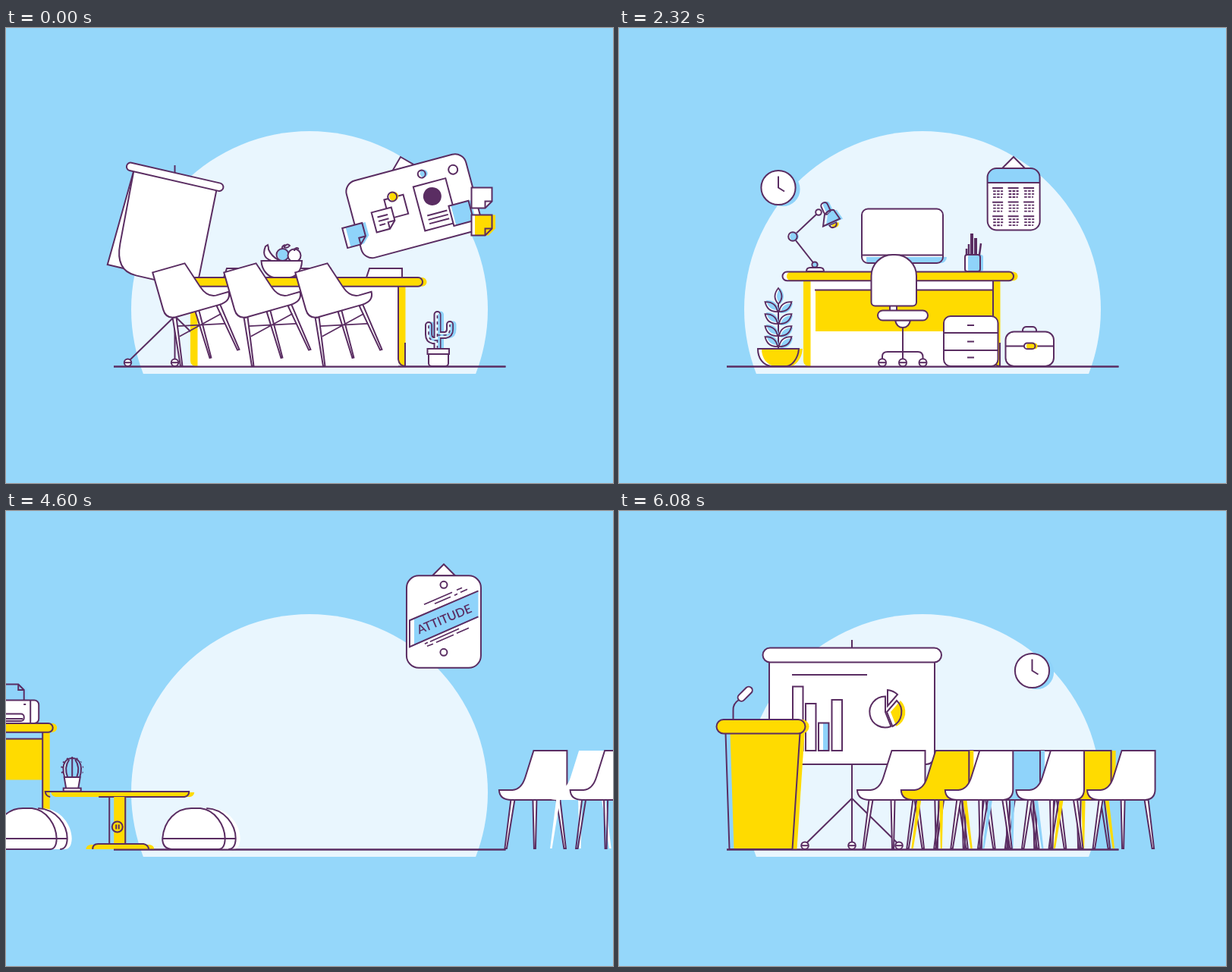
Animation of 800x600 px, one loop 6.2 s. Source, as an HTML page with a canvas:

```html
<!DOCTYPE html>
<html lang="en">
<head>
<meta charset="utf-8">
<title>Office rooms</title>
<style>
html, body { margin: 0; width: 100%; height: 100%; overflow: hidden; background: #95d7fa; }
canvas { display: block; }
</style>
</head>
<body>
<canvas id="stage" width="800" height="600"></canvas>
<script>
const c = document.getElementById('stage').getContext('2d');
const LOOP = 6200, FLOOR = 446.5;
const SKY = '#95d7fa', PALE = '#e9f6fe', INK = '#5a2d62', SUN = '#ffdb00', BLUE = '#8fd3fa', WHITE = '#fff';
let t = 0;

// timing
const part = (a, d) => Math.min(1, Math.max(0, (t - a) / d));
const come = (a, d, from) => from * (1 - part(a, d)) ** 3;
const go = (a, d, to) => to * part(a, d) ** 3;
const smooth = (a, d) => { const p = part(a, d); return p * p * (3 - 2 * p); };
const out = (a, d) => 1 - (1 - part(a, d)) ** 3;
const swing = (a, amp, decay, period) => {
  const s = Math.max(0, t - a);
  return amp * Math.exp(-s / decay) * Math.cos(2 * Math.PI * s / period);
};

// drawing
function at(dx, dy, fn) {
  c.save(); c.translate(dx, dy); fn(); c.restore();
}
function turn(x, y, deg, fn) {
  c.save(); c.translate(x, y); c.rotate(deg * Math.PI / 180); c.translate(-x, -y); fn(); c.restore();
}
function fill(p, color, dx = 0, dy = 0) {
  at(dx, dy, () => { c.fillStyle = color; c.fill(p); });
}
function ink(p, w = 2) {
  c.strokeStyle = INK; c.lineWidth = w; c.stroke(p);
}
function shape(p, color = WHITE, dx = 0, base = WHITE) {
  if (dx && base) fill(p, base);
  if (color) fill(p, color, dx);
  ink(p);
}
const path = d => new Path2D(d);
const line = (d, w) => ink(path(d), w);
function box(x, y, x2, y2, r = 0) {
  const p = new Path2D(); p.roundRect(x, y, x2 - x, y2 - y, r); return p;
}
function disc(x, y, r) {
  const p = new Path2D(); p.arc(x, y, r, 0, 7); return p;
}
function wheel(x, r = 4.7) {
  shape(disc(x, 441.2, r)); line(`M${x - r} 441.2h${2 * r}`);
}
function note(x, y, color, dx) {
  const p = path(`M${x} ${y}h27v18l-9 9h-18z`);
  shape(p, color, dx);
  line(`M${x + 27} ${y + 18}h-9v9`);
}
function clock(x, y) {
  const p = disc(x, y, 22.6);
  fill(p, BLUE, 6, 2); fill(p, WHITE); ink(p);
  line(`M${x} ${y - 15}v15l8 5`);
}
function hanger(x, w) {
  shape(path(`M${x - w} 185L${x} 170L${x + w} 185z`));
}

// chair facing right, back edge at x = 0
const seat = path('M0 317H44L55 352Q60 368 72 369H89.5Q89 382 73 382H13Q0 381 0 368z');
const legs = path('M9 382h5L4 446H1.5zM40 382h5L43.5 446h-2zM69 382h5L82 446h-2.5z');
function chair(x) {
  at(x, 0, () => {
    shape(legs); line('M12 394L73 408M72 394L11 408', 1.7);
    shape(seat);
  });
}
function rowChair(x, color, dx) {
  at(x + 89.5, -1, () => {
    c.scale(-1, 1);
    fill(legs, color, -dx); fill(seat, color, -dx);
    ink(legs);
    if (dx > 0 || color === WHITE) fill(seat, color);
    ink(seat);
  });
}

// the desk reshapes from room to room
const desks = [
  [213.5, 549, 329, 243, 517, 255, 517, 341, 341, 1],
  [215.5, 520, 321.5, 243, 493, 259, 493, 345.5, 400, 1],
  [135.5, 454.5, 280, 152.5, 441, 167.5, 441, 300.5, 354.5, 0]
];
function desk() {
  const p = smooth(1400, 320), q = smooth(2680, 380);
  const [x0, x1, y, l, r, a, b, h0, h1, w] = desks[0].map((v, i) =>
    v + (desks[1][i] - v) * p + (desks[2][i] - desks[1][i]) * q);
  const under = y + 12;
  c.globalAlpha = w;
  fill(box(l + 9, under, r, 446), WHITE);
  c.globalAlpha = 1;
  fill(box(l, under, l + 9.5, 446, [0, 0, 0, 7]), SUN);
  if (h1 - h0 > 2) {
    fill(box(a, h0, b, h1), SUN);
    line(`M${a - 1} ${h0}H${b}`);
  }
  fill(box(r, under, r + 9.5, 446, [0, 0, 0, 7]), SUN);
  line(`M${r} ${under}V437Q${r + 1} 445 ${r + 9} 446V${446 - 44 + 13 * (1 - q)}`);
  const top = box(x0, y, x1, y + 11.7, 5.8);
  fill(top, WHITE); fill(top, SUN, 5.5); ink(top);
}

function easel() {
  at(0, go(1060, 300, -460), () => {
    line('M222.5 181V437M222.5 380L163 438M222.5 380L282 438');
    wheel(160.5); wheel(222.5); wheel(284);
    turn(222.5, 196, swing(0, 13, 220, 600), () => {
      shape(path('M168 200L162 329H186V200z'));
      shape(path('M168 200L172 298C173 324 184 334.500 202 334.500H266C279 333 284 324 283 312L280 200z'));
      shape(box(157.5, 191, 288, 201.500, 5.2));
    });
  });
}

function board() {
  at(0, go(1130, 300, -400), () => turn(520, 170, swing(0, -15, 560, 1000), () => {
    hanger(520, 15);
    shape(box(438.5, 184.5, 601.5, 289.5, 15));
    shape(disc(541, 199, 5), BLUE, 3);
    shape(disc(582.5, 204, 6));
    shape(box(484.5, 219, 510.5, 245));
    shape(disc(496, 218, 6), SUN, 2);
    note(464, 231, WHITE, 0);
    line('M470 239h14M470 244.500h14M470 250h8');
    shape(box(526, 212.5, 570, 272.5));
    fill(disc(547, 231, 12), INK);
    line('M534 254h27M534 259.500h27M534 265h27');
    note(421.5, 241, BLUE, 4.5);
    const s = box(564.500, 249, 591.5, 276);
    shape(s, BLUE, 3);
  }));
}

function bowl() {
  fill(disc(366, 298.5, 8), BLUE); ink(disc(364.500, 299, 8));
  line('M364 292q-1-5 4-6M366 289q5-6 8-2q-3 4-8 2');
  shape(disc(380, 300, 8.5)); line('M380 294q0-3 3-4q3 0 2 2');
  shape(path('M342 288l3-2q1 3 1 6q4 9 13 14l-4 2q-20-3-13-20z'));
  shape(path('M336.500 307H390C390 321 380 329 374 329H353C346 328 337 320 336.500 307z'));
}

function cactus() {
  const p = path('M568.500 423V378M568.500 412H563Q557 411 557 404V392M568.500 405H579Q585 404 585 397V391');
  c.lineCap = 'round';
  at(4, 0, () => { c.strokeStyle = BLUE; c.lineWidth = 9; c.stroke(p); });
  ink(p, 10);
  c.strokeStyle = PALE; c.lineWidth = 6; c.stroke(p);
  at(2, 0, () => { c.strokeStyle = BLUE; c.lineWidth = 2.5; c.stroke(p); });
  c.setLineDash([4, 4]); c.lineCap = 'butt'; ink(p, 1.6); c.setLineDash([]);
  shape(box(557, 428, 583, 446, [0, 0, 4, 4])); shape(box(555.5, 423, 584, 430));
}

function meeting() {
  easel(); board();
  at(0, go(1230, 300, -420), () => {
    note(613.5, 210.500, WHITE, 0); note(613.5, 246.5, SUN, 4.5);
  });
  const up = go(1260, 280, -460);
  at(0, up, () => [287, 381, 475].forEach(x => shape(path(`M${x} 329l4-12h43v12z`))));
  desk();
  at(0, up, bowl);
  at(go(1310, 300, 300), 0, cactus);
  const tilt = -16 * Math.exp(-t / 150) * Math.abs(Math.cos(Math.PI * t / 300));
  [228.5, 322.5, 416.5].forEach((x, i) => {
    at(go(1300 + i * 40, 320, -560), 0, () => turn(x + 1.5, 446, tilt, () => chair(x)));
  });
}

function lamp() {
  line('M258 312L229 275L263 243');
  shape(path('M247 321Q247 316 252 316H265Q270 316 270 321z'));
  shape(disc(258, 312, 3.6), BLUE, 1);
  shape(disc(229, 275, 5.8), BLUE, 2);
  shape(disc(263, 243, 3.8));
  const bulb = path('M277 260Q280 265 285 262Q288 259 286 256z');
  fill(bulb, SUN, 3); ink(bulb);
  turn(272, 237, -25, () => shape(box(267.5, 230, 276.5, 246, 4), BLUE, 3));
  const shade = path('M271 246Q277 239 283 240L291 251.500L269 261.500z');
  fill(shade, BLUE, 4); ink(shade);
}

function plant() {
  const leaf = (x, y, deg) => turn(x, y, deg, () => {
    const p = path(`M${x} ${y}q-9-10 0-21q9 11 0 21z`);
    fill(p, WHITE); fill(p, BLUE, 2.5); ink(p, 1.8);
  });
  line('M210 423V352');
  [374, 390, 406, 420].forEach(y => { leaf(209, y, -52); leaf(211, y, 52); });
  leaf(210, 364, 0);
  shape(path('M183 423H237C236 437 227 445.500 221 446H200C190 444 183 436 183 423z'), SUN, 5);
}

function calendar() {
  hanger(520, 15);
  const p = box(485.5, 185, 554.5, 266.5, 12);
  fill(p, WHITE);
  c.save(); c.clip(p); c.fillStyle = BLUE; c.fillRect(485, 185, 70, 19); c.restore();
  ink(p); line('M485.500 204h69');
  for (let i = 0; i < 9; i++) {
    const x = 492 + i % 3 * 20.5, y = 211 + (i / 3 | 0) * 18.6;
    line(`M${x} ${y}h14`);
    c.setLineDash([3.6, 1.4]);
    for (let k = 1; k < 4; k++) line(`M${x + 1} ${y + k * 4}h${k < 3 ? 13 : 12}`, 1.8);
    c.setLineDash([]);
  }
}

function officeChair() {
  line('M374 394V437M347 437V433Q347 427 354 427H394Q400.500 427 400.500 434V437');
  [347, 374, 400.5].forEach(x => wheel(x, 5));
  shape(path('M364 385.500H384Q382 395 374 395Q366 395 364 385.500z'));
  shape(box(357, 365, 366, 373));
  shape(box(332.5, 299, 392, 366.5, [28, 28, 5, 5]));
  shape(box(341, 372.5, 407, 385.5, 6.5));
}

function briefcase() {
  line('M532 400V398Q533 394 537 394H545Q549 394 550 398V400');
  shape(box(509.5, 400.5, 573, 446, 11));
  line('M509.500 419.500H573');
  shape(box(534, 415.5, 548.5, 423.3, 3.9), SUN, 3);
}

function office() {
  at(0, come(1580, 330, -300) + go(2600, 230, -360), () => clock(210, 210.5));
  at(0, come(1500, 300, -300) + go(2620, 250, -380), () =>
    turn(520, 170, t < 1700 ? 9 : swing(1700, 9, 160, 450), calendar));
  if (t < 2900) {
    at(0, come(1570, 330, -360) + go(2640, 250, -460), () => {
      const m = box(320, 238.5, 427, 310, 8);
      fill(m, WHITE); fill(box(326, 302, 432, 310, [0, 0, 8, 3]), BLUE); ink(m);
      line('M320 299.500H427');
    });
    at(0, come(1640, 330, -380) + go(2610, 250, -440), lamp);
    at(0, come(1660, 300, -380) + go(2670, 230, -440), () => {
      line('M461 300V285M475 299L477 284M458 299V291', 2.5);
      line('M465 300V271M470 300V277', 4);
      shape(box(456, 299, 476, 321, 3), BLUE, 4);
    });
  }
  desk();
  at(come(1560, 350, -300), go(2600, 280, -520), plant);
  at(come(1520, 350, 520) + go(2620, 300, 520), 0, officeChair);
  at(come(1590, 340, 420) + go(2600, 280, 420), 0, () => {
    shape(box(428, 380, 499.5, 446, 9));
    line('M428 402H499.500M428 425H499.500M459 392h9M459 413.500h9M459 434.500h9');
  });
}

function poster() {
  hanger(577, 15);
  shape(box(528, 185, 626, 306.5, 16));
  const p = out(3300, 350);
  if (!p) return;
  c.save();
  c.beginPath(); c.rect(528, 186, 98 * p, 120); c.clip();
  shape(disc(577, 197, 4.5)); shape(disc(577, 286, 4.5));
  const band = path('M622.500 205L532 244V279L622.500 239');
  fill(path('M622.500 206L538 242V277L622.500 240z'), BLUE);
  ink(band);
  line('M551 223L588 207M565 222L586 213M591 211l4-2M599 207l9-4M601 201l-7 3', 1.8);
  line('M552 275l4-2M559 272L597 255M555 278l8-3M567 273L590 263M594 261l16-7', 1.8);
  c.translate(577.5, 242); c.rotate(-0.4);
  c.font = '600 16px Lato, sans-serif'; c.textAlign = 'center'; c.textBaseline = 'middle';
  c.fillStyle = INK; c.fillText('ATTITUDE', 0, 1);
  c.restore();
}

function pouf(x) {
  at(x, 0, () => {
    const back = path('M30 392H58C82 393 96.500 414 96.500 432Q96 446 87 446H12Q0 445 0 432C2 408 18 392 38 392z');
    fill(back, WHITE, 6); fill(back, WHITE);
    line('M58 392C82 393 96.500 414 96.500 432Q96 446 87 446');
    shape(path('M0 432C2 408 18 392 38 392H50C70 394 82 415 82.500 432Q82 446 74 446H12Q0 445 0 432z'));
    line('M0 432H96.500');
  });
}

function roundTable() {
  fill(path('M452 371H641Q640 377 634 377H458Q453 376 452 371z'), SUN);
  line('M515 377H628Q634 376 634 370H444.500Q445 376 451 377');
  fill(box(535, 377, 551, 440), SUN);
  fill(path('M498 446Q499 440 505 440H582Q588 441 588 446z'), SUN);
  line('M529 377V439M550 377V439M507 446Q507 439 514 439H574Q580 440 581 446');
  shape(disc(539.5, 416.5, 7), SUN);
  line('M538 413.500v6M541.500 413.500v6');
}

function roundCactus() {
  const body = path('M470 351C464 330 475 326 480 326C486 326 496 331 490 351z');
  for (let i = 0; i < 9; i++) {
    const a = Math.PI * (0.9 + i * 0.15), x = Math.cos(a), y = Math.sin(a);
    line(`M${480 + 11 * x} ${340 + 12 * y}L${480 + 15 * x} ${340 + 16 * y}`);
  }
  shape(body, BLUE, 2);
  line('M474 351Q469 338 476 328M480 351V326M486 351Q491 338 484 328');
  shape(path('M469.500 351H490.500L488 366H472z')); shape(box(468.5, 365.5, 491.5, 369.5));
}

function studio() {
  const exit = go(4280, 400, -760);
  at(0, come(2800, 300, -340) + go(4440, 260, -420), () =>
    turn(577, 170, swing(3200, 12.4, 250, 673), poster));
  at(exit, 0, () => {
    at(0, come(2780, 380, -330), () => {
      line('M173 257Q166 257 166 264.500Q166 272 173 272');
      const mug = box(172.5, 252, 195.5, 280);
      shape(mug, WHITE, 5);
      line('M187.500 249V260'); shape(box(184, 260, 191.5, 271));
    });
    at(0, come(2886, 400, -300), () => {
      const rise = 24 * (1 - out(3380, 350));
      if (rise < 23.5) {
        c.save(); c.beginPath(); c.rect(350, 200, 90, 50); c.clip();
        at(0, rise, () => {
          const sheet = path('M377 252V228.500H409L416.500 236V252z');
          fill(sheet, WHITE); fill(sheet, BLUE, 5); ink(sheet);
          line('M409 228.500V236H416.500');
        });
        c.restore();
      }
      shape(box(355.5, 249.5, 436, 280, 6));
      line('M366.500 250V280M425 250V280M416 255h3');
      shape(box(377, 267.5, 416.5, 277, 4)); line('M378 274h37');
    });
    desk();
  });
  at(exit - 401.7 * smooth(2700, 400), 0, briefcase);
  at(exit, 0, () => {
    at(come(3178, 500, 400), 0, () => {
      const grow = out(3520, 300);
      if (grow) {
        c.save(); c.translate(0, 369.5); c.scale(1, grow); c.translate(0, -369.5);
        roundCactus(); c.restore();
      }
      roundTable();
    });
    pouf(377 + come(3092, 500, 450));
    pouf(599 + come(3260, 480, 260));
  });
}

function screen() {
  line('M307 170V437M307 379L247 438M307 379L367 438');
  [245, 307, 369].forEach(x => wheel(x, 4.8));
  shape(box(198, 195, 416, 334, [0, 0, 11, 11]));
  shape(box(189.5, 180.5, 425, 199.5, 9.5));
  const grow = out(5480, 320);
  if (!grow) return;
  line(`M228 216h${99 * grow}`);
  [[229, 231.5], [246, 254], [263, 279.5], [280.5, 249]].forEach(([x, y], i) => {
    const p = box(x, 316 - (316 - y) * grow, x + 13.5, 316);
    fill(p, WHITE);
    if (i === 2) fill(box(x + 6, 316 - (316 - y) * grow, x + 13.5, 316), BLUE);
    ink(p);
  });
  c.save(); c.translate(351, 265); c.scale(grow, grow);
  shape(path('M0 0V-20.500A20.500 20.500 0 1 0 7.500 19z'));
  const slice = path('M2 0L15 -15A21 21 0 0 1 9.500 19z');
  fill(slice, WHITE); fill(slice, SUN, 5); ink(slice);
  shape(path('M3 -8V-29Q11 -28 16 -23z'));
  c.restore();
}

function podium() {
  const y = come(4925, 400, 200);
  c.save();
  c.beginPath(); c.rect(0, 0, 800, 447); c.clip();
  c.translate(0, y);
  at(0, come(4950, 420, 37), () => {
    line('M150.500 276V263Q150 254 158 249');
    turn(166, 241, -45, () => shape(box(154.5, 236.5, 177.5, 246, 4.700)));
  });
  const body = path('M140.500 293L145.500 446H228.500L238.500 293z');
  fill(body, BLUE); fill(body, SUN, 6); ink(body);
  const top = box(128.5, 275, 245.5, 293.5, 9.2);
  fill(top, SUN, 5); fill(top, SUN); ink(top);
  c.restore();
}

function hall() {
  at(0, come(5280, 380, -300), () => clock(544.5, 210.5));
  at(come(5130, 420, -450), 0, screen);
  podium();
  const settle = out(5000, 400), xs = [0, 93.7, 187.3];
  const back = come(4540, 450, 520), mid = come(4716, 450, 520), front = come(4753, 450, 520);
  xs.forEach((x, i) => rowChair(314 + x + back, WHITE, i ? -34 * (1 - settle) : 0));
  xs.forEach((x, i) => rowChair(371.8 + x + mid, i === 1 ? BLUE : SUN, -8 + 14 * settle));
  xs.forEach(x => rowChair(429.8 + x + front, WHITE, 0));
}

function frame(now) {
  t = now % LOOP;
  c.fillStyle = SKY; c.fillRect(0, 0, 800, 600);
  c.save();
  c.beginPath(); c.rect(0, 0, 800, 456); c.clip();
  fill(disc(400, 371, 235), PALE);
  c.restore();
  c.lineJoin = 'miter';
  line(`M142 ${FLOOR}H658.500`, 2.2);
  if (t < 1720) meeting();
  if (t >= 1500 && t < 2930) {
    if (t < 1720) c.globalCompositeOperation = 'source-over';
    office();
    if (t < 2680) at(come(1640, 320, 300), 0, briefcase);
  }
  if (t >= 2680 && t < 4710) studio();
  if (t >= 4530) hall();
  line(`M142 ${FLOOR}H658.500`, 2.2);
}

const start = performance.now();
(function tick() {
  frame(performance.now() - start);
  requestAnimationFrame(tick);
})();
</script>
</body>
</html>
```
